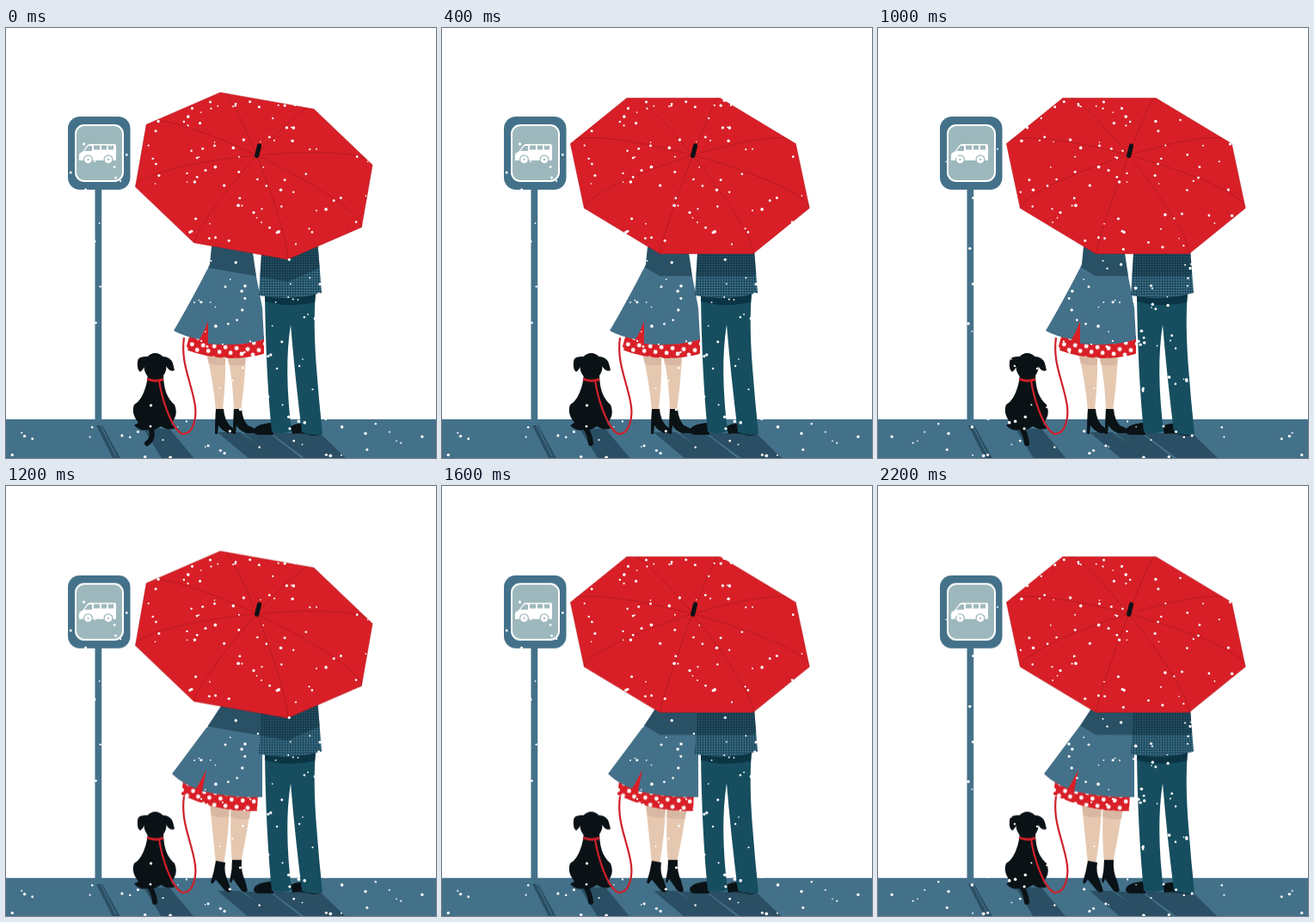
Write an HTML page that moves like this. It is 500 by 500 pixels and loops after 2400 ms.

```html
<!DOCTYPE html>
<html lang="en">
<head>
<meta charset="utf-8">
<title>Snowy bus stop</title>
<style>
  html, body { margin: 0; width: 100%; height: 100%; overflow: hidden; background: #fff; }
  svg { display: block; width: 100vw; height: 100vh; }
  .half { animation: half 2400ms step-end infinite; }
  .flake { animation: half 400ms step-end infinite; }
  .lean { animation-delay: -1200ms; }
  .flip { animation-delay: -200ms; }
  .turn { animation: third 600ms step-end infinite; }
  .wag { animation: first 2400ms step-end infinite; }
  .rest { animation: later 2400ms step-end infinite; }
  .scene { animation: settle 2400ms step-end infinite; }
  @keyframes half { 0% { opacity: 1 } 50%, 100% { opacity: 0 } }
  @keyframes third { 0% { opacity: 1 } 33.3333%, 100% { opacity: 0 } }
  @keyframes first { 0% { opacity: 1 } 8.3333%, 100% { opacity: 0 } }
  @keyframes later { 0% { opacity: 0 } 8.3333%, 100% { opacity: 1 } }
  @keyframes settle { 0% { transform: none } 50%, 100% { transform: translateY(.7px) } }
</style>
</head>
<body>
<svg viewBox="0 0 500 500">
  <defs>
    <pattern id="knit" width="3" height="3" patternUnits="userSpaceOnUse">
      <path fill="#3d6e86" d="M0 0h3v3H0z"/>
      <path d="M0 .5H3M.5 0V3" stroke="#1c485b"/>
    </pattern>
    <pattern id="polka" width="13" height="14" patternUnits="userSpaceOnUse" patternTransform="translate(207 363) rotate(5)">
      <path fill="#d81f27" d="M0 0h13v14H0z"/>
      <circle cx="3.200" cy="10" r="2.400" fill="#fff"/>
      <circle cx="9.700" cy="4" r="2.400" fill="#fff"/>
    </pattern>
    <path id="dressStand" d="M240 245H285L287 262L291 289L298 325L300 362Q272 371 235 367V341Q230 354 225 362Q208 359 195 352Q215 318 237 275Z"/>
    <path id="dressLean" d="M256 246H298V361Q262 362 228 354L233 329Q226 343 221 351Q206 346 193 334L237 275Z"/>
    <path id="sweater" d="M298 245H362L367 308Q330 318 294 311Z"/>
    <clipPath id="clipStand"><use href="#dressStand"/></clipPath>
    <clipPath id="clipLean"><use href="#dressLean"/></clipPath>
    <clipPath id="clipSweater"><use href="#sweater"/></clipPath>
  </defs>

  <g class="scene">
    <path fill="#44718a" d="M0 455H500V502H0Z"/>
    <g fill="#2a4e63">
      <path d="M105 462H112L134 502H125Z"/>
      <path d="M160 466H190L220 502H182Z"/>
      <path d="M246 470H272L320 502H284Z"/>
      <path d="M276 471H306L346 502H316Z"/>
      <path d="M308 471H365L397 502H350Z"/>
    </g>
    <path d="M110 462L128 498" stroke="#44718a" stroke-width="1.200"/>

    <!-- bus stop -->
    <path fill="#44718a" d="M103.500 186h7.700V457h-7.700z"/>
    <rect x="72" y="103" width="72.500" height="85" rx="14" fill="#44718a"/>
    <rect x="81" y="113" width="55" height="65" rx="10" fill="#9db8bc" stroke="#fff" stroke-width="2"/>
    <path fill="#fff" d="M85 154V148Q85 145 89 144L95 136Q96 135 98 135H126Q128 135 128 138V154Z"/>
    <path fill="#9db8bc" d="M91 143L96 137H100V143ZM102 136.500h7v5h-7zM111 136.500h6v5h-6zM119 136.500h6v5h-6z"/>
    <g fill="#fff" stroke="#9db8bc" stroke-width="1.200">
      <circle cx="95.500" cy="153" r="4.900"/>
      <circle cx="119" cy="153" r="4.900"/>
    </g>
    <path d="M94.500 153h2M118 153h2" stroke="#9db8bc" stroke-width="2"/>

    <!-- woman -->
    <g class="half">
      <path fill="#e6c8b0" d="M233 378H255Q256 405 252 445H244Q241 410 233 378ZM257 378H279Q278 410 273 445H265Q264 410 257 378Z"/>
      <path fill="#d8b8a2" d="M233 378H255V391Q245 394 236 390ZM257 378H279L278 391Q268 394 259 391Z"/>
      <path fill="#0a1216" d="M244 443H253Q254 455 260 462Q266 466 267 471H258Q251 468 247 462L246 472H243Q243 455 244 443ZM265 443H274Q275 455 281 462Q290 465 294 471H279Q271 468 268 462L267 472H264Q264 455 265 443Z"/>
      <path fill="url(#polka)" d="M214 355L209 374Q253 391 300 379V358L235 340Z"/>
      <path fill="#d81f27" d="M236 340L225 362L236 367Z"/>
      <use href="#dressStand" fill="#44718a"/>
      <g class="shade" clip-path="url(#clipStand)"/>
    </g>
    <g class="half lean">
      <path fill="#e6c8b0" d="M237 370H260Q259 405 253 439H244Q241 408 237 370ZM262 370H285Q280 405 273 438H263Q260 408 262 370Z"/>
      <path fill="#d8b8a2" d="M237 370H260L259 384Q248 386 239 382ZM262 370H285L283 386Q272 388 261 384Z"/>
      <path fill="#0a1216" d="M244 435L255 437Q253 449 258 458L262 470Q259 473 255 470L244 457L240 462L238 460Q242 448 244 435ZM263 434H274Q273 448 278 458L281 470Q278 473 274 470L264 456L262 461L260 459Q263 446 263 434Z"/>
      <path fill="url(#polka)" d="M206 342L204 358Q246 379 292 377L293 355L233 328Z"/>
      <path fill="#d81f27" d="M233 328L220 351L229 355Z"/>
      <use href="#dressLean" fill="#44718a"/>
      <g class="shade" clip-path="url(#clipLean)"/>
    </g>

    <!-- man -->
    <path fill="#0a1216" d="M288 468Q290 460 311 459V473H293Q288 472 288 468ZM331 463Q340 458 346 461L367 470Q366 474 357 474Q345 470 333 472Z"/>
    <path fill="#164e60" d="M301 308H360Q357 345 361 395Q364 435 368 472Q356 475 344 470Q336 405 331 345Q323 395 332 469Q320 473 309 470Q302 400 301 308Z"/>
    <path fill="#0b3444" d="M301 309H360L359 319Q330 326 301 318Z"/>
    <use href="#sweater" fill="url(#knit)"/>
    <g class="shade" clip-path="url(#clipSweater)"/>

    <!-- dog -->
    <g fill="#0a1216">
      <path d="M165 402H183Q183 418 188 428Q192 435 196 438Q201 450 192 460L197 465Q189 469 180 463Q172 469 164 467Q157 470 149 462L154 459Q145 448 149 438Q154 435 157 430Q164 418 165 402Z"/>
      <ellipse cx="173.500" cy="393.500" rx="13" ry="15.500"/>
      <path d="M165 382Q153 381 153 388Q152 397 156 400Q160 397 163 390ZM182 382Q191 382 194 390L196 398Q190 401 185 391Z"/>
    </g>
    <g fill="none" stroke="#0a1216" stroke-width="6" stroke-linecap="round">
      <path class="wag" d="M169 465Q172 478 164 483"/>
      <path class="rest" d="M166 464Q172 472 173 483"/>
    </g>
    <g fill="none" stroke="#cf202a">
      <path d="M164 408Q173 412 183 408.500" stroke-width="3"/>
      <path d="M178 410C181 430 192 466 205 472C218 473 223 452 219 434C214 408 203 388 207 360" stroke-width="2.200"/>
    </g>

    <g id="umbrella"/>
    <path d="M291.700 148.500L294.500 137" stroke="#0a1216" stroke-width="5.200" stroke-linecap="round"/>
  </g>

  <g class="flake"><g id="snow" fill="#fff"/></g>
  <g class="flake flip"><use href="#snow" transform="matrix(-1 0 0 1 500 0)"/></g>
</svg>
<script>
  const make = (tag, attrs, parent) => {
    const el = document.createElementNS('http://www.w3.org/2000/svg', tag);
    for (const key in attrs) el.setAttribute(key, attrs[key]);
    return parent.appendChild(el);
  };

  // The canopy is a tilted dome: eight points on a skewed ellipse, joined to a fixed tip.
  const tip = [291.5, 148], bow = 0.5523;
  const rim = deg => {
    const a = deg * Math.PI / 180, c = Math.cos(a), s = Math.sin(a);
    return [-73.5 * c + 123 * s, -90.5 * c - 37.5 * s];
  };

  const umbrella = document.getElementById('umbrella');
  const shades = document.querySelectorAll('.shade');
  for (let step = 0; step < 3; step++) {
    const sway = step === 1 ? 3 : 0;
    const hub = [288.3 + sway, 172 + sway / 3];
    // A point reached by going outward to the rim and upward to the tip.
    const at = (p, out, up) =>
      hub.map((h, i) => (h + p[i] * out + (tip[i] - h) * up).toFixed(2)).join(' ');

    const points = Array.from({ length: 8 }, (_, i) => rim(15 + 15 * step + 45 * i));
    const outline = 'M' + points.map(p => at(p, 1, 0)).join('L') + 'Z';
    const ribs = points.map(p =>
      `M${at(p, 0, 1)}C${at(p, bow, 1)} ${at(p, 1, bow)} ${at(p, 1, 0)}`).join('');

    const style = `animation-delay:${200 * step - 600}ms`;
    const g = make('g', { class: 'turn', style, stroke: '#b0181f' }, umbrella);
    make('path', { d: outline }, make('clipPath', { id: 'canopy' + step }, g));
    make('path', { d: outline, fill: '#d81f27', 'stroke-width': 0.5 }, g);
    make('path', { d: ribs, fill: 'none', 'stroke-width': 0.8, 'clip-path': `url(#canopy${step})` }, g);

    for (const shade of shades) {
      const s = make('g', { class: 'turn', style }, shade);
      make('path', {
        d: outline, transform: `translate(0 ${26 - sway})`, fill: '#0b2a3a', 'fill-opacity': 0.46
      }, s);
    }
  }

  // Snow: seeded flakes, thinning out towards the ground.
  let seed = 20;
  const random = () => {
    seed = (seed * 16807) % 2147483647;
    return seed / 2147483647;
  };
  const snow = document.getElementById('snow');
  for (let i = 0; i < 400; i++) {
    make('circle', {
      cx: (500 * random()).toFixed(1),
      cy: (84 + 416 * random() ** 1.25).toFixed(1),
      r: (0.8 + 1.1 * random()).toFixed(2)
    }, snow);
  }
</script>
</body>
</html>
```
